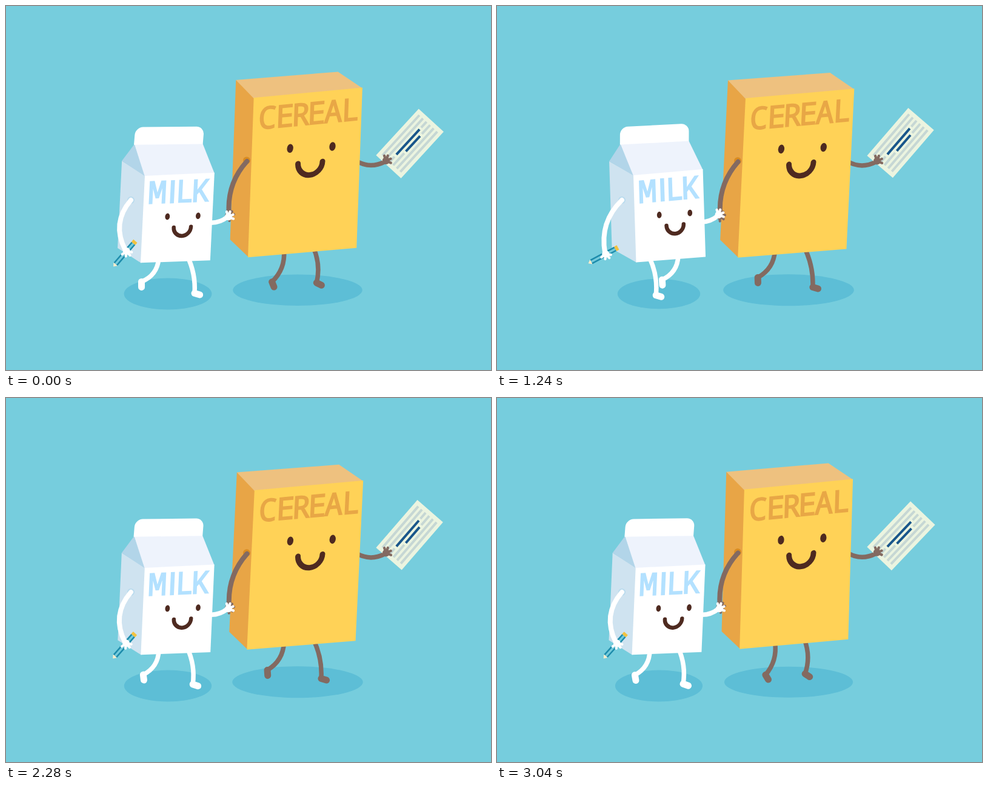
Recreate the animation shown at these times as an HTML page. Size 800 px wide and 600 px high, loop 3.08 s.

```html
<!DOCTYPE html>
<html lang="en">
<head>
<meta charset="utf-8">
<title>Milk and cereal taking a walk</title>
<style>
  html, body { margin: 0; width: 100%; height: 100%; overflow: hidden; background: #76cddd; }
  svg { display: block; width: 100%; height: 100%; }
  .line { fill: none; stroke-linecap: round; stroke-linejoin: round; }
  .brown { stroke: #836a61; }
  .white { stroke: #fff; }
  .limb { stroke-width: 7.5; }
  .foot { stroke-width: 11; }
  .smile { stroke: #4e2a20; }
  .eyes { fill: #4e2a20; }
  .shadow { fill: #5dbed6; }
  text { font: 400 51px "Noto Sans Mono", monospace; text-anchor: middle; stroke-width: 1.7; }
  .orange { fill: #e8a746; stroke: #e8a746; }
  .sky { fill: #b3e1ff; stroke: #b3e1ff; }
  .plain { font-family: Lato, sans-serif; }
</style>
</head>
<body>
<svg viewBox="0 0 800 600">
  <defs>
    <g id="hand" class="line">
      <circle r="3" stroke-width="6"/>
      <path d="M0 0L3.5-8M0 0L7.8-4.2M0 0L8 2.8M0 0L3.6 8" stroke-width="4.2"/>
    </g>
  </defs>

  <ellipse id="cerealShadow" class="shadow" cx="481" cy="468.3"/>
  <ellipse id="milkShadow" class="shadow" cx="267" cy="474.5"/>

  <!-- cereal -->
  <g class="line brown">
    <path id="cerealRightLeg" class="limb"/><path id="cerealRightFoot" class="foot"/>
    <path id="cerealLeftLeg" class="limb"/><path id="cerealLeftFoot" class="foot"/>
    <path id="paperArm" class="limb"/>
  </g>
  <g id="paper">
    <rect x="-52" y="-28" width="104" height="56" fill="#ebf4e0"/>
    <path d="M-45-20H45M-45-12H45M-45-4H-33M32-4H45M-45 4H-18M25 4H45M-45 12H45M-45 20H45"
      fill="none" stroke="#c6d7d4" stroke-width="4"/>
    <path d="M-28.5-4H28M-14 4H20.5" fill="none" stroke="#19568b" stroke-width="4"/>
  </g>
  <use id="paperHand" href="#hand" class="brown"/>
  <g id="cereal">
    <path d="M1 0L-30.7-32.2V231L1 263z" fill="#e8a546"/>
    <path d="M0 1L-30.7-32.2L138.5-30L180 1z" fill="#eec17f"/>
    <path d="M0 0H180V264.5L0 263z" fill="#ffd257"/>
    <text class="orange" x="24 53.5 79.5 106 133 162" y="53">CEREAL</text>
    <g class="eyes">
      <ellipse cx="63.5" cy="89.5" rx="5.2" ry="7.3"/>
      <ellipse cx="133.8" cy="92.8" rx="5.2" ry="7.3"/>
    </g>
    <path class="line smile" d="M77.5 116a20.3 20.5 0 0 0 40.6 0" stroke-width="9"/>
  </g>
  <circle id="cerealSocket" r="6" fill="#d98c22"/>
  <path id="cerealArm" class="line brown" stroke-width="8"/>
  <use id="cerealHand" href="#hand" class="brown"/>

  <!-- milk -->
  <g class="line white">
    <path id="milkRightLeg" class="limb"/><path id="milkRightFoot" class="foot"/>
    <path id="milkLeftLeg" class="limb"/><path id="milkLeftFoot" class="foot"/>
    <path id="holdArm" class="limb"/>
  </g>
  <use id="holdHand" href="#hand" class="white"/>
  <g id="milk">
    <path d="M1 0L-39.2-26.5V117.5L1 144z" fill="#cfe3f0"/>
    <path d="M-20-53L-39.2-26.5L1 1z" fill="#b2d5e9"/>
    <path d="M-20-53.5L93-49.3L115 1H0z" fill="#eef3fc"/>
    <path transform="translate(-20.6 -52.3) rotate(2)" fill="#fff"
      d="M0 0V-16a13 13 0 0 1 13-13H101a13 13 0 0 1 13 13V0z"/>
    <path d="M0 0H115V144.5L0 143.5z" fill="#fff"/>
    <text class="sky" y="46.5"><tspan x="22.4">M</tspan><tspan x="47" class="plain">I</tspan><tspan x="67.5 94.3">LK</tspan></text>
    <g class="eyes">
      <ellipse cx="40.7" cy="69" rx="3.9" ry="5.4"/>
      <ellipse cx="91.4" cy="70" rx="3.9" ry="5.4"/>
    </g>
    <path class="line smile" d="M52 87.5a14.2 14.5 0 0 0 28.4 0" stroke-width="6.5"/>
  </g>
  <circle cx="206" cy="320" r="6" fill="#b9dbee"/>
  <g id="pencil">
    <path d="M-23-4.2H22V4.2H-23z" fill="#1c8bab"/>
    <path d="M-23-1.7H22V1.7H-23z" fill="#74cadb"/>
    <path d="M-23-4.2L-28.5 0L-23 4.2z" fill="#fbeccb"/>
    <path d="M22-4.2H27V4.2H22z" fill="#f3c23f"/>
  </g>
  <path id="pencilArm" class="line white" stroke-width="8"/>
  <use id="pencilHand" href="#hand" class="white"/>
</svg>

<script>
const LOOP = 3080, TICK = 40, RAD = Math.PI / 180;
const el = id => document.getElementById(id);
const set = (id, name, value) => el(id).setAttribute(name, value);
const wave = angle => (1 - Math.cos(angle)) / 2;

const place = (id, x, y, turn = 0) =>
  set(id, 'transform', `translate(${x} ${y}) rotate(${turn})`);

// Shear a box: its top edge tips by `tip` degrees, its sides lean by `lean`.
const rock = (id, x, y, tip, lean) => {
  const a = tip * RAD, b = lean * RAD;
  set(id, 'transform',
    `matrix(${Math.cos(a)} ${Math.sin(a)} ${-Math.sin(b)} ${Math.cos(b)} ${x} ${y})`);
};

const shadow = (id, rx, ry) => {
  set(id, 'rx', rx);
  set(id, 'ry', ry);
};

// A soft limb between two joints, bowed sideways.
const limb = (id, x1, y1, x2, y2, bow) => {
  const dx = x2 - x1, dy = y2 - y1, k = bow / Math.hypot(dx, dy);
  const cx = (x1 + x2) / 2 - dy * k, cy = (y1 + y2) / 2 + dx * k;
  set(id, 'd', `M${x1} ${y1}Q${cx} ${cy} ${x2} ${y2}`);
};

// Swing a leg from planted in front (0) to lifted behind (1).
const leg = (name, [hipX, hipY], [x, y], swing, lift) => {
  const ax = x - 45 * swing;
  const ay = y - 26 * swing - lift * Math.sin(2 * Math.PI * swing);
  const toe = (14 + 82 * swing ** 1.4) * RAD;
  limb(name + 'Leg', hipX, hipY, ax, ay, -8 - 7 * swing);
  set(name + 'Foot', 'd', `M${ax} ${ay}l${9 * Math.cos(toe)} ${9 * Math.sin(toe)}`);
};

// Feet travel more evenly than the body sways.
const stride = angle => {
  const even = Math.acos(Math.cos(angle)) / Math.PI;
  return (even + wave(angle)) / 2;
};

// Both characters sway between leaning forward (0) and leaning back (1).
function drawCereal(angle) {
  const t = wave(angle), step = stride(angle);
  shadow('cerealShadow', 102 + 6 * t, 24.5 + 1.5 * t);
  leg('cerealLeft', [458.5, 403], [472, 470], step, 4);
  leg('cerealRight', [507, 398], [524, 467], 1 - step, 4);
  rock('cereal', 403 + 7.2 * t, 148 + 4.2 * t, -6.7 + 1.7 * t, -.9 + 3.8 * t);

  place('cerealSocket', 397, 250.5 + 5 * t);
  limb('cerealArm', 397.5, 252 + 5 * t, 367 + t, 341, 23 - 5 * t);
  place('cerealHand', 368 - t, 343 + 3 * t, 20 * t);

  limb('paperArm', 576, 252 + 3 * t, 625, 255 + 2 * t, 14);
  place('paper', 668.5 - 3 * t, 231 - 5.5 * t, -39.7 - 9.8 * t);
  place('paperHand', 626 + t, 253.5 + 2 * t, -38 - 5 * t);
}

function drawMilk(angle) {
  const t = wave(angle), step = stride(angle);
  shadow('milkShadow', 68 + 4.5 * t, 24.7 + 1.3 * t);
  leg('milkLeft', [252, 416], [266, 479], step, 0);
  leg('milkRight', [299, 412], [313.5, 475], 1 - step, 0);
  rock('milk', 224.8 + 4.3 * t, 279 + t, -5.1 + 2.6 * t, -2 + 4.9 * t);

  limb('holdArm', 333, 356 + t, 365, 345 + 3 * t, 7);
  place('holdHand', 365.5 + 1.5 * t, 344 + 3.5 * t, -44);

  const swing = t * (1.4 - .4 * t);
  limb('pencilArm', 206, 320, 177 + 20 * swing, 407 - 5 * swing, 24 + 4 * swing);
  place('pencil', 174.5 + 21.5 * swing, 411 - 3 * swing, -27 - 22.5 * swing);
  place('pencilHand', 178 + 21 * swing, 409 - 5 * swing, 75 + 3 * swing);
}

function draw(now) {
  const time = Math.floor(now % LOOP / TICK) * TICK;
  const turn = 2 * Math.PI * time / LOOP;
  drawCereal(3 * turn + Math.PI - .96);
  drawMilk(4 * turn - 3.427);
}

const start = performance.now();
const frame = () => {
  draw(performance.now() - start);
  requestAnimationFrame(frame);
};
frame();
</script>
</body>
</html>
```
